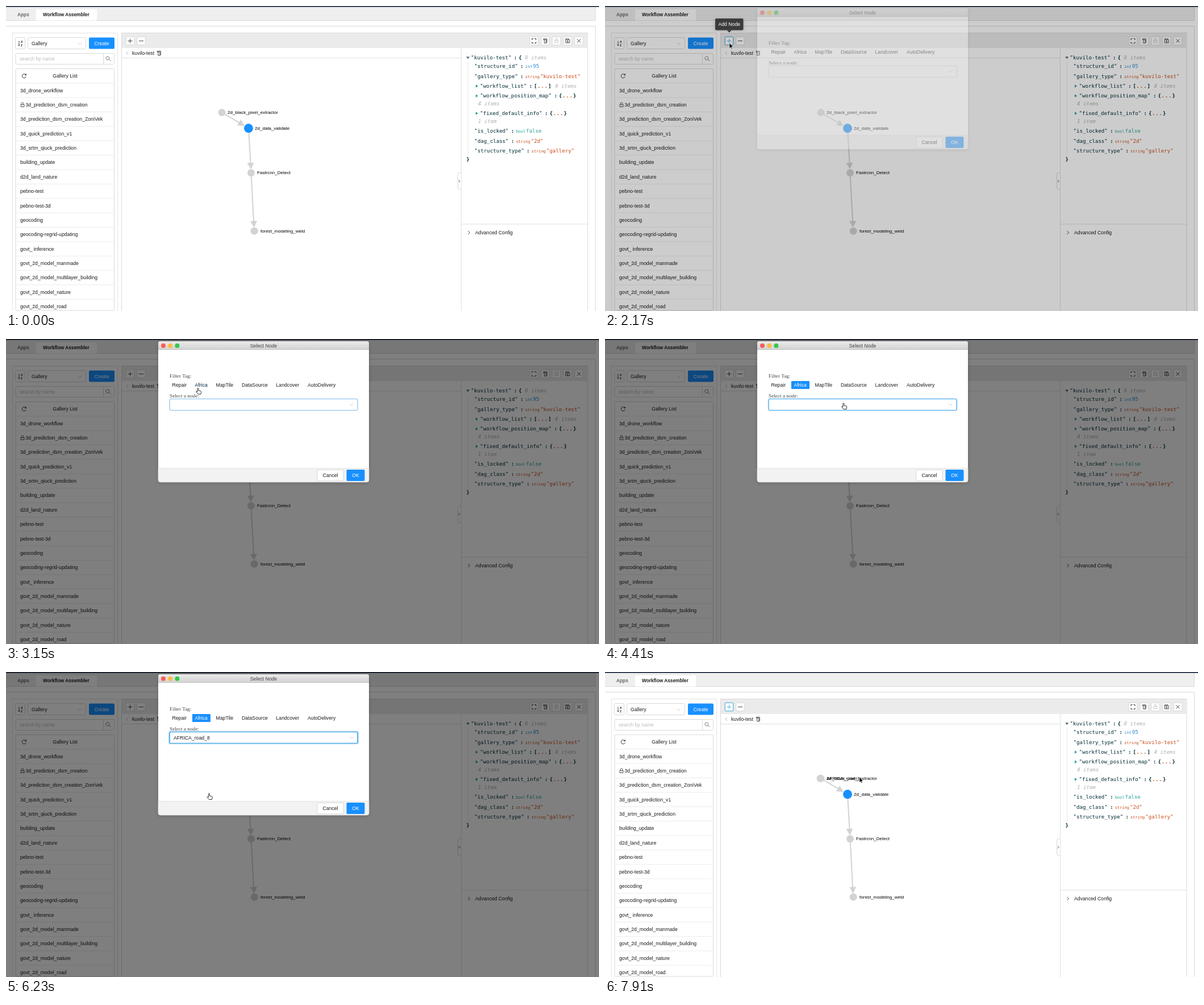
An HTML page that plays this animation: 1044 px wide and 537 px high, repeating every 8000 ms.

```html
<!DOCTYPE html>
<html lang="en">
<head>
<meta charset="utf-8">
<title>Workflow Assembler</title>
<style>
html, body { margin: 0; width: 100%; height: 100%; overflow: hidden; background: #fff; }
svg { display: block; }
text { font: 8.7px "Liberation Sans", Arial, sans-serif; fill: #1c1c1c; }
.tab { font-size: 8.3px; font-weight: bold; }
.node { font-size: 8.05px; fill: #000; }
.mono { font: 9.1px "DejaVu Sans Mono", monospace; fill: #002b36; }
.bold { font-weight: bold; }
.type { font: 7px "DejaVu Sans Mono", monospace; }
.count { font: italic 9.1px "DejaVu Sans Mono", monospace; fill: #b0b0b0; }
.serif { font: 9.25px "Liberation Serif", serif; fill: #444; }
.tiny { font-size: 5px; font-weight: bold; }
</style>
</head>
<body>
<script>
const BLUE = '#1890ff', GREY = '#d3d3d3', LINE = '#d9d9d9', SOFT = '#ebebeb', INK = '#333';

// Markup helpers; text is placed by the middle of its capitals.
const text = (x, y, s, cls = '', attr = '') =>
  `<text x="${x}" y="${y + 3.1}" class="${cls}" ${attr}>${s}</text>`;
const fill = c => `style="fill:${c}"`;
const rect = (x, y, w, h, f = '#fff', s = 'none', r = 0, attr = '') =>
  `<rect x="${x}" y="${y}" width="${w}" height="${h}" rx="${r}" fill="${f}" stroke="${s}" ${attr}/>`;
const path = (d, s = LINE, w = 1, f = 'none') =>
  `<path d="${d}" stroke="${s}" stroke-width="${w}" fill="${f}"/>`;
const circle = (x, y, r, f) => `<circle cx="${x}" cy="${y}" r="${r}" fill="${f}"/>`;
const group = (id, s, attr = '') => `<g id="${id}" ${attr}>${s}</g>`;
const at = (x, y, s) => `<g transform="translate(${x} ${y})">${s}</g>`;

const chevronDown = (x, y) => path(`M${x - 3} ${y - 1.5}l3 3.3 3-3.3`, '#bfbfbf', .8);
const chevronRight = (x, y, s, c = INK) => path(`M${x - s / 2} ${y - s}l${s} ${s}-${s} ${s}`, c, .9);
const magnifier = (x, y, r, c) =>
  path(`M${x + r * .6} ${y + r * .6}l${r} ${r}M${x + r * .8} ${y - r * .1}a${r} ${r} 0 1 1-.01-.1`, c, .9);
const lock = (x, y, c) => at(x, y, path('M-3-.5h6v4h-6zM-2-.5v-1.5a2 2 0 0 1 4 0v1.5M0 1v1.2', c, .8));
const copy = (x, y) => at(x, y, path('M-3-3.5h6v6.5l-1.5 1h-3v-6h-1.5zM-1.5-2h3.2v6', INK, .9));
const save = (x, y) => at(x, y, path('M-3.5-3.5h5.5l1.5 1.5v5.5h-7zM-1.7-3.5v2.2h3.2v-2.2M-1 1.4a1 1 0 1 0 2 0a1 1 0 1 0-2 0', INK, .9));
const plus = c => path('M214.5 61.5h8M218.5 57.5v8', c, .9);

function edge(x1, y1, x2, y2) {
  const len = Math.hypot(x2 - x1, y2 - y1), angle = Math.atan2(y2 - y1, x2 - x1) * 180 / Math.PI;
  return `<g transform="translate(${x1} ${y1}) rotate(${angle})">` +
    path(`M0 0H${len - 9}`, GREY, 2) + path(`M${len} 0l-11.5-6v12z`, 'none', 0, GREY) + '</g>';
}

function header() {
  return rect(0, 0, 1044, 537) + rect(0, 2, 1037, 23, '#efefef') +
    path('M0 25.5H1037.5M1037.5 2V25M0 35.5H1037.5V537') + rect(53, 6, 107, 19.5) + rect(0, 0, 1044, 1.6, '#0a1a30') +
    text(20, 15, 'Apps', 'tab', fill('#666')) + text(65, 15, 'Workflow Assembler', 'tab');
}

function sidebar() {
  const rows = ['3d_drone_workflow', '3d_prediction_dsm_creation', '3d_prediction_dsm_creation_ZoniVek',
    '3d_quick_prediction_v1', '3d_srtm_qiuck_prediction', 'building_update', 'd2d_land_nature', 'pebno-test',
    'pebno-test-3d', 'geocoding', 'geocoding-regrid-updating', 'govt_ inference', 'govt_2d_model_manmade',
    'govt_2d_model_multilayer_building', 'govt_2d_model_nature', 'govt_2d_model_road'];
  return rect(11.5, 47.5, 185, 500, '#fff', '#e4e4e4') +
    rect(16.5, 55.5, 17, 20, '#fff', LINE, 1) + path('M23 61.5v8.5l-1.5-1.8M23 70l1.5-1.8', INK, .9) +
    text(26, 62.3, 'A', 'tiny') + text(26, 67.6, 'Z', 'tiny') +
    rect(38.5, 55.5, 102, 20, '#fff', LINE, 2) + text(45, 65.5, 'Gallery') + chevronDown(130, 66) +
    rect(146, 55.5, 45, 20, BLUE, 'none', 2) + text(168.5, 65.5, 'Create', '', 'text-anchor="middle" ' + fill('#fff')) +
    rect(17, 83.5, 173.5, 19, '#fff', LINE, 2) + path('M171.5 83.5v19') + text(24, 93, 'search by name', '', fill('#bcbcbc')) +
    magnifier(179.5, 92, 3, '#666') +
    rect(17, 110.5, 173.5, 425.5, '#fff', LINE, 2) + text(104, 123, 'Gallery List', '', 'text-anchor="middle"') +
    path('M35 121.2a3.6 3.6 0 1 0 .4 3M35.4 119.2v2.4h-2.4', INK, 1) +
    rows.map((s, i) => {
      const y = 148.5 + i * 25.37;
      return path(`M17.5 ${y - 12.7}H190`, '#ececec') + text(i == 1 ? 34.5 : 25, y, s);
    }).join('') + lock(29, 174, INK);
}

function toolbar() {
  const button = x => rect(x - 7.2, 54.2, 14.4, 14.4, '#fff', LINE, 1);
  return rect(203.5, 47.5, 820.5, 500, '#fff', LINE) + rect(204, 48, 819.5, 26, SOFT) +
    [218.5, 238, 929.5, 949.3, 969, 988.8, 1008.6].map(button).join('') +
    plus(INK) + path('M234 61.5h8', INK, .9) +
    path('M926 60v-2.5h2.5M930.5 57.5h2.5v2.5M933 63v2.5h-2.5M928.5 65.5h-2.5v-2.5', INK, 1) +
    copy(949.3, 61.3) + lock(969, 61, '#bbb') + save(988.8, 61.4) + path('M1005.6 58.4l6 6M1011.6 58.4l-6 6', INK, 1) +
    path('M204 91.5H801M801.5 74V537M801.5 384H1024', '#e0e0e0') +
    path('M215 80l-3 3 3 3', '#aaa', .8) + text(222, 83, 'kuvilo-test') + copy(269.3, 83) +
    rect(795.5, 293.5, 9, 29.5, '#fff', LINE, 3) + rect(802, 290, 5, 36) + path('M801.5 290V326', '#e0e0e0') +
    chevronRight(798, 308.5, 2) + chevronRight(815, 399, 3) + text(826, 398.5, 'Advanced Config');
}

function graph() {
  return edge(380, 187.5, 420, 211) + edge(427, 215, 431.2, 287.5) + edge(431.5, 293.5, 436.7, 390) +
    circle(380, 187.5, 6.5, GREY) + circle(427, 215.3, 8, BLUE) + circle(431.5, 293.7, 6.5, GREY) + circle(437.2, 396.2, 6.5, GREY) +
    text(390, 186.7, '2d_black_pixel_extractor', 'node') + text(438, 215, '2d_data_validate', 'node') +
    text(442, 293, 'Fastrcnn_Detect', 'node') + text(448, 396, 'forest_modeling_weld', 'node');
}

function jsonTree() {
  const colors = { int: '#268bd2', string: '#cb4b16', bool: '#2aa198' };
  const key = (x, y, name) => text(x, y, `"${name}"`, 'mono') +
    text(x + (name.length + 2) * 5.478 + 4.3, y, ':', 'mono bold');
  const after = (x, name) => x + (name.length + 2) * 5.478 + 12.8;
  const leaf = (y, name, type, value) => {
    const x = after(824.6, name), color = fill(colors[type]);
    return key(824.6, y, name) + text(x, y + .2, type, 'type', color) +
      text(x + type.length * 4.214 + 1, y, value, 'mono', color);
  };
  const branch = (y, name, [open, close]) => {
    const x = after(834.6, name);
    return path(`M827 ${y - 2.8}l4 2.8-4 2.8z`, 'none', 0, '#2aa198') + key(834.6, y, name) +
      text(x, y, open, 'mono bold') + text(x + 6, y, '...', 'mono bold', 'letter-spacing=".8" ' + fill('#cb4b16')) +
      text(x + 25, y, close, 'mono bold');
  };
  return path('M813.5 98V264', SOFT) + path('M810.2 89.3h6l-3 4z', 'none', 0, '#586e75') +
    key(818.6, 90.7, 'kuvilo-test') + text(902.6, 90.7, '{', 'mono bold') + text(913.5, 90.7, '8 items', 'count') +
    leaf(106, 'structure_id', 'int', '95') + leaf(123.7, 'gallery_type', 'string', '"kuvilo-test"') +
    branch(141, 'workflow_list', '[]') + text(966.5, 141, '4 items', 'count') +
    branch(158.3, 'workflow_position_map', '{}') + text(831, 172, '4 items', 'count') +
    branch(189, 'fixed_default_info', '{}') + text(831, 203, '1 item', 'count') +
    leaf(220, 'is_locked', 'bool', 'false') + leaf(237.5, 'dag_class', 'string', '"2d"') +
    leaf(255, 'structure_type', 'string', '"gallery"') + text(810.5, 270.3, '}', 'mono bold');
}

function dialog() {
  const tags = [[292.5, 'Repair'], [332.5, 'Africa'], [369.5, 'MapTile'], [415, 'DataSource'], [475.5, 'Landcover'], [531, 'AutoDelivery']];
  const items = ['building_4_step', 'building_modeling_small', 'road_5_6', 'road_5_6_7_8', 'road_8', 'road_9',
    'update_7_11', 'update_road_proposal_prob'];
  const list = rect(288, 127, 331, 164, '#fff', 'none', 2, 'filter="url(#shadow)"') +
    rect(288, 130, 331, 19.8, '#f3f3f3', 'none', 0, 'id="hover"') +
    items.map((s, i) => text(295, 140 + i * 19.8, 'AFRICA_' + s)).join('') + rect(614, 130, 5, 29.5, '#7d7d7d', 'none', 2);
  return rect(268, 4, 371, 248, '#fff', 'none', 4, 'filter="url(#shadow)"') +
    path('M268 18.5V8q0-4 4-4H635q4 0 4 4V18.5z', 'none', 0, 'url(#bar)') + path('M268 18.5H639', '#b8b8b8', .8) +
    circle(277, 11.7, 4, '#fc5b57') + circle(289.2, 11.7, 4, '#fdbc40') + circle(301.4, 11.7, 4, '#34c84a') +
    text(453.5, 11.7, 'Select Node', '', 'text-anchor="middle" ' + fill('#444')) +
    path('M268 227.5H639V248q0 4-4 4H272q-4 0-4-4z', '#e2e2e2', .8, '#f2f2f2') +
    rect(548, 230.3, 46, 19.5, '#fff', LINE, 2) + text(571, 240, 'Cancel', '', 'text-anchor="middle"') +
    rect(599.5, 230, 32, 20, BLUE, 'none', 2) + rect(599.5, 230, 32, 20, '#40a9ff', 'none', 2, 'id="okHover"') +
    text(615.5, 240, 'OK', '', 'text-anchor="middle" ' + fill('#fff')) +
    text(288, 65.3, 'Filter Tag:', 'serif') + text(288, 99.5, 'Select a node:', 'serif') +
    tags.map(([x, s]) => text(x, 81, s)).join('') +
    group('tagHover', text(332.5, 81, 'Africa', '', fill(BLUE))) +
    group('tagOn', rect(328, 74, 32, 14, BLUE, 'none', 1) + text(332.5, 81, 'Africa', '', fill('#fff'))) +
    rect(288, 105.5, 331, 20, '#fff', LINE, 2) + rect(288, 105.5, 331, 20, 'none', '#40a9ff', 2, 'id="inputHover"') +
    group('inputFocus', rect(287.5, 105, 332, 21, 'none', '#1890ff44', 2, 'stroke-width="3"') + rect(288, 105.5, 331, 20, 'none', '#40a9d8', 2)) +
    group('arrow', chevronDown(608.5, 115.3)) + group('search', magnifier(607.7, 114.5, 2.3, '#bbb')) +
    group('value', text(295, 115.5, 'AFRICA_road_8')) + rect(295, 109.5, 1, 12, '#222', 'none', 0, 'id="caret"') +
    group('list', list);
}

document.body.innerHTML = `<svg width="1044" height="537" viewBox="0 0 1044 537"><defs>
  <linearGradient id="bar" x2="0" y2="1"><stop stop-color="#ebebeb"/><stop offset="1" stop-color="#d2d2d2"/></linearGradient>
  <filter id="shadow"><feDropShadow dx="0" dy="1.5" stdDeviation="3" flood-opacity=".2"/></filter></defs>` +
  header() + sidebar() + toolbar() +
  group('addFocus', rect(211.3, 54.2, 14.4, 14.4, '#fff', '#40a9d8', 1) + plus('#5bb0dc')) +
  graph() + group('newNode', circle(379, 187.3, 6.5, GREY) + text(390, 186.7, 'AFRICA_road_8', 'node')) + jsonTree() +
  rect(0, 0, 1044, 537, '#000', 'none', 0, 'id="mask"') + group('dialog', dialog()) +
  group('tip', rect(194, 22, 49.5, 20.5, '#3a3a3a', 'none', 2, 'filter="url(#shadow)"') +
    path('M214.5 42.4h8.5l-4.2 4.4z', 'none', 0, '#3a3a3a') + text(218.8, 32.2, 'Add Node', '', 'text-anchor="middle" ' + fill('#fff'))) +
  group('pointer', path('M0 0V9.6L2.2 7.6 3.6 10.8 5.1 10.2 3.7 7H6.6Z', '#fff', .6, '#000')) +
  group('hand', path('M-1 1a1 1 0 0 1 2 0V4.2L4.8 5Q6 5.4 5.7 7L5 10.5H0L-3.3 6.5Q-3.3 5.3-2.2 5.5L-1 6.6Z', '#000', .8, '#fff')) +
  '</svg>';

const LOOP = 8000, STEP = 70;
const el = id => document.getElementById(id);
const show = (id, opacity) => el(id).setAttribute('opacity', +opacity);
const ramp = (t, a, b) => Math.min(1, Math.max(0, (t - a) / (b - a)));
const within = (t, a, b) => t >= a && t < b;

// Cursor stops: time, x, y
const stops = [[300, 456, 453], [840, 203, 62], [910, 203, 62], [1120, 210, 50], [1330, 228, 58], [1470, 219, 65],
  [2450, 219, 65], [2730, 262, 20], [3010, 331, 112], [3150, 338, 86.5], [3290, 338, 86.5], [3500, 346, 81],
  [3920, 346, 81], [4270, 420, 113], [4620, 420, 113], [5320, 356, 215], [5390, 357.5, 214], [6230, 357.5, 214],
  [6790, 618, 240], [7140, 620, 238.5], [7210, 620, 238.5], [7630, 452, 199], [7770, 446, 191], [7910, 448, 185]];

function cursorAt(t) {
  const i = stops.findIndex(s => s[0] > t);
  if (i < 1) return stops[i < 0 ? stops.length - 1 : 0].slice(1);
  const [t0, x0, y0] = stops[i - 1], [t1, x1, y1] = stops[i];
  const p = (t - t0) / (t1 - t0), e = p * p * (3 - 2 * p);
  return [x0 + (x1 - x0) * e, y0 + (y1 - y0) * e];
}

function draw(now) {
  const t = Math.floor(now % LOOP / STEP) * STEP;
  const [x, y] = cursorAt(t);
  const hand = within(t, 2940, 6300);
  for (const id of ['pointer', 'hand']) el(id).setAttribute('transform', `translate(${x} ${y})`);
  show('pointer', t >= 350 && !hand);
  show('hand', hand);

  const tip = ramp(t, 1650, 1820) * (1 - ramp(t, 2260, 2420)), scale = .8 + .2 * tip;
  show('tip', tip);
  el('tip').setAttribute('transform', `translate(218.8 47) scale(${scale}) translate(-218.8 -47)`);
  show('addFocus', ramp(t, 1050, 1250) - ramp(t, 2240, 2450) + ramp(t, 7200, 7350));

  const open = ramp(t, 2110, 2260) * (1 - ramp(t, 7180, 7400));
  show('mask', .5 * open);
  show('dialog', open);
  show('tagHover', .9 * ramp(t, 3090, 3300));
  show('tagOn', ramp(t, 3640, 3850));
  show('inputHover', ramp(t, 2940, 3080) * (1 - ramp(t, 3050, 3290)) + ramp(t, 4130, 4340));
  show('inputFocus', ramp(t, 4340, 4550));
  show('okHover', ramp(t, 6650, 6860));

  const drop = ramp(t, 4410, 4620) * (1 - ramp(t, 5980, 6160));
  const searching = within(t, 4480, 6020);
  show('list', drop);
  el('list').setAttribute('transform', `translate(0 127) scale(1 ${.8 + .2 * drop}) translate(0 -127)`);
  const row = Math.min(7, Math.max(0, Math.floor((y - 130) / 19.8)));
  el('hover').setAttribute('y', 129.9 + row * 19.8);
  show('search', searching);
  show('arrow', !searching);
  show('caret', within(t, 4480, 5000) || within(t, 5530, 6020));
  show('value', t >= 6020);
  show('newNode', t >= 7280);
  requestAnimationFrame(draw);
}
requestAnimationFrame(draw);
</script>
</body>
</html>
```
